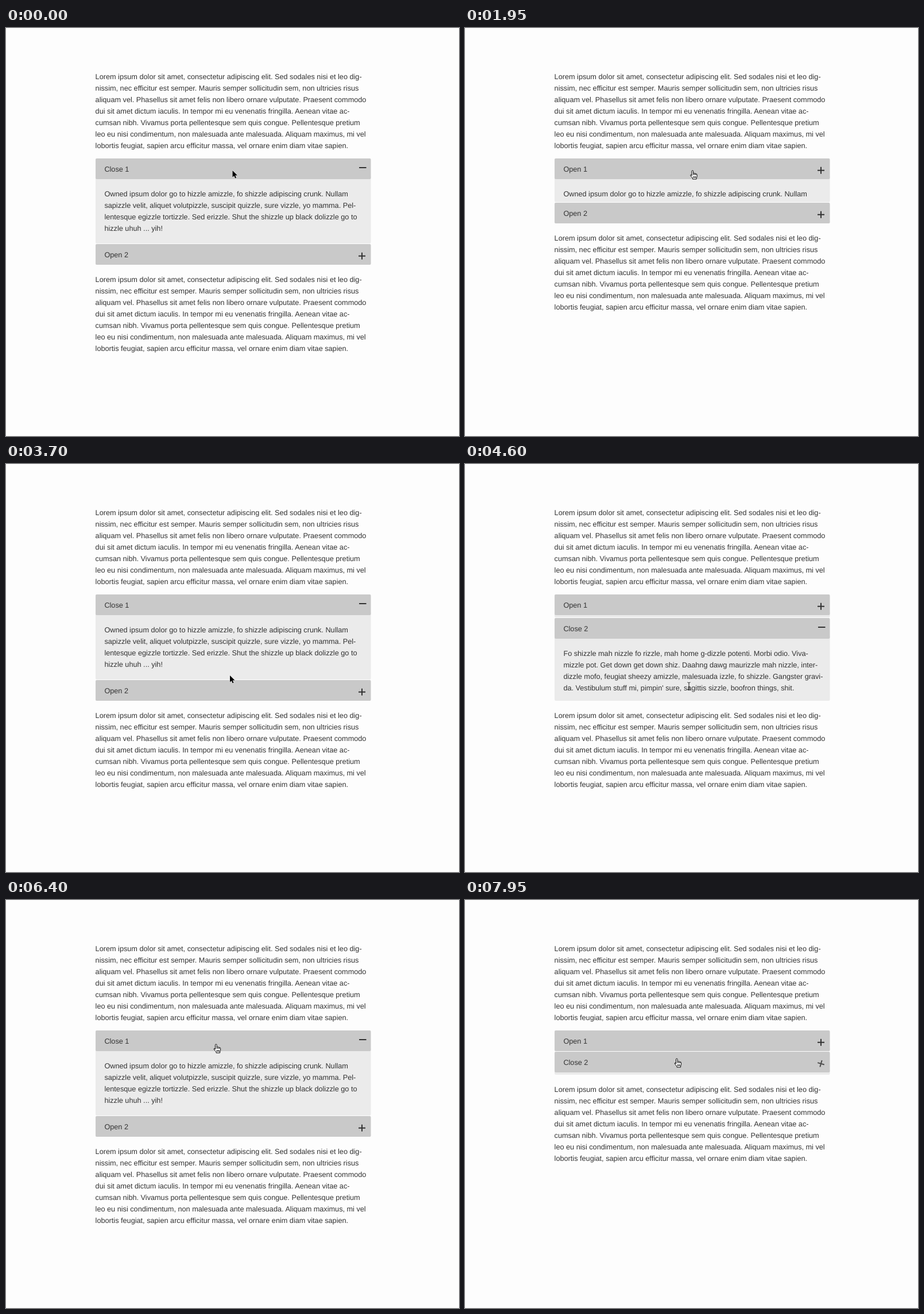
Write an HTML page that moves like this. It is 789 px wide and 710 px high and loops after 8 s.

```html
<!DOCTYPE html>
<html lang="en">
<head>
<meta charset="utf-8">
<title>Accordion</title>
<style>
  html, body { margin: 0; height: 100%; overflow: hidden; background: #fdfdfd; }
  svg { display: block; }
  text { font: 12.7px "Liberation Sans", Arial, sans-serif; fill: #333; text-rendering: geometricPrecision; }
  .head { fill: #c9c9c9; }
  .panel { fill: #ebebeb; }
  .icon { stroke: #333; stroke-width: 2; }
</style>
</head>
<body>
<svg id="stage" width="789" height="710"></svg>
<script>
const LOOP = 8000, SLIDE = 530, SPIN = 200;
const LEFT = 156, TOP = 227, WIDTH = 479.5, HEAD = 36, GAP = 1, PANEL = 112, LINE = 20;

const lorem = [
  'Lorem ipsum dolor sit amet, consectetur adipiscing elit. Sed sodales nisi et leo dig-',
  'nissim, nec efficitur est semper. Mauris semper sollicitudin sem, non ultricies risus',
  'aliquam vel. Phasellus sit amet felis non libero ornare vulputate. Praesent commodo',
  'dui sit amet dictum iaculis. In tempor mi eu venenatis fringilla. Aenean vitae ac-',
  'cumsan nibh. Vivamus porta pellentesque sem quis congue. Pellentesque pretium',
  'leo eu nisi condimentum, non malesuada ante malesuada. Aliquam maximus, mi vel',
  'lobortis feugiat, sapien arcu efficitur massa, vel ornare enim diam vitae sapien.'
];
const contents = [[
  'Owned ipsum dolor go to hizzle amizzle, fo shizzle adipiscing crunk. Nullam',
  'sapizzle velit, aliquet volutpizzle, suscipit quizzle, sure vizzle, yo mamma. Pel-',
  'lentesque egizzle tortizzle. Sed erizzle. Shut the shizzle up black dolizzle go to',
  'hizzle uhuh ... yih!'
], [
  'Fo shizzle mah nizzle fo rizzle, mah home g-dizzle potenti. Morbi odio. Viva-',
  'mizzle pot. Get down get down shiz. Daahng dawg maurizzle mah nizzle, inter-',
  'dizzle mofo, feugiat sheezy amizzle, malesuada izzle, fo shizzle. Gangster gravi-',
  "da. Vestibulum stuff mi, pimpin' sure, sagittis sizzle, boofron things, shit."
]];

// Click time, then whether each item is open afterwards
const clicks = [
  [-1000, 1, 0], [1610, 0, 0], [2881, 1, 0], [4089, 0, 1],
  [5580, 1, 0], [6690, 0, 0], [7933, 0, 1]
];
// Pointer moves: start, end, x, y
const moves = [
  [-2, -1, 394.5, 248], [340, 350, 395.5, 248], [3380, 3700, 390, 368],
  [3720, 3950, 390, 386.5], [4780, 5400, 365, 251], [7530, 7850, 368, 276]
];
const presses = [[650, 750], [1600, 1650]];

const stage = document.getElementById('stage');
const clamp = v => Math.min(1, Math.max(0, v));

function add(parent, tag, attrs = {}) {
  const node = document.createElementNS('http://www.w3.org/2000/svg', tag);
  set(node, attrs);
  return parent.appendChild(node);
}
function set(node, attrs) {
  for (const key in attrs) node.setAttribute(key, attrs[key]);
}
function paragraph(parent, lines, x, y) {
  const group = add(parent, 'g');
  lines.forEach((line, i) => add(group, 'text', { x, y: y + i * LINE }).textContent = line);
  return group;
}
const shift = (node, x, y) => set(node, { transform: `translate(${x} ${y})` });
const show = (node, visible) => set(node, { visibility: visible ? 'visible' : 'hidden' });

paragraph(stage, lorem, 155.6, 89.2);
const footer = paragraph(stage, lorem, 155.6, 30.2);

const items = contents.map(lines => {
  const group = add(stage, 'g');
  const panel = add(group, 'rect', { class: 'panel', y: 30, width: WIDTH, rx: 2 });
  const clip = add(group, 'svg', { y: HEAD, width: WIDTH });
  paragraph(clip, lines, 15.4, 30.4);
  add(group, 'rect', { class: 'head', width: WIDTH, height: HEAD, rx: 2 });
  const label = add(group, 'text', { x: 15.4, y: 22.7 });
  const plus = add(group, 'path', { class: 'icon', d: 'M-6 0H6M0-6V6' });
  const minus = add(group, 'path', { class: 'icon', d: 'M459 16H471.5' });
  return { group, panel, clip, label, plus, minus };
});

const ring = add(stage, 'circle', {
  r: 17, fill: '#fff', 'fill-opacity': .15, stroke: '#000', 'stroke-width': 3
});
const pointer = add(stage, 'g');
const cursors = {
  arrow: [
    ['M0 0V11.8L2.8 9.2 4.6 13.6 6.6 12.8 4.8 8.5H8.6Z', '#fff', '#fff'],
    ['M0 0V11.8L2.8 9.2 4.6 13.6 6.6 12.8 4.8 8.5H8.6Z', '#000', 'none']
  ],
  hand: [
    ['M-.5 9V1.3Q-.5 0 .8 0T2.1 1.3V5Q3.5 4.2 4.4 5.2 5.6 4.5 6.6 5.8 8.6 5.5 8.6 7.5V10.5Q8.2 12 7.6 13V15H1V13.5Q-.6 11.5-2.6 9-3.3 7.6-2 7.3-1.2 7.3-.5 9Z', '#fff', '#000'],
    ['M2.2 5V8M4.4 5.5V8M6.5 6V8M2.3 10V13M4.3 10V13M6.2 10V13', 'none', '#000']
  ],
  beam: [['M-2.5-6.5Q0-6.5 0-5 0-6.5 2.5-6.5M0-5V5M-2.5 6.5Q0 6.5 0 5 0 6.5 2.5 6.5M-1.5 2H1.5', 'none', '#222']]
};
for (const name in cursors) {
  const group = add(pointer, 'g');
  for (const [d, fill, stroke] of cursors[name]) add(group, 'path', { d, fill, stroke });
  cursors[name] = group;
}

function pointerAt(t) {
  let [, , x, y] = moves[0];
  for (const [start, end, toX, toY] of moves) {
    const p = clamp((t - start) / (end - start));
    const eased = p * p * (3 - 2 * p);
    x += (toX - x) * eased;
    y += (toY - y) * eased;
  }
  return [x, y];
}

function openness(t, item, duration) {
  return clicks.reduce((v, click) => v + (click[item + 1] - v) * clamp((t - click[0]) / duration), 0);
}

function draw(t) {
  const [x, y] = pointerAt(t);
  const current = clicks.filter(click => click[0] <= t).pop();
  let top = TOP, cursor = 'arrow';

  items.forEach((item, i) => {
    const height = Math.round(PANEL * openness(t, i, SLIDE));
    const spin = openness(t, i, SPIN);
    shift(item.group, LEFT, top);
    set(item.panel, { height: 6 + height });
    set(item.clip, { height });
    item.label.textContent = `${current[i + 1] ? 'Close' : 'Open'} ${i + 1}`;
    set(item.plus, { transform: `translate(464 20.8) rotate(${180 * spin})`, opacity: (1 - spin) ** 2 });
    set(item.minus, { opacity: spin ** 2 });

    const inside = y - top;
    if (inside >= 0 && inside < HEAD) cursor = 'hand';
    else if (inside > HEAD + 16 && inside < HEAD + Math.min(height, 96)) cursor = 'beam';
    top += HEAD + height + (i ? 0 : GAP);
  });

  shift(footer, 0, top);
  // The page gets focus, and its own cursors, with the first real click
  if (t < clicks[1][0]) cursor = 'arrow';
  shift(pointer, x, y);
  for (const name in cursors) show(cursors[name], name === cursor);
  set(ring, { cx: x - .5, cy: y + .5 });
  show(ring, presses.some(([from, to]) => t >= from && t < to));
}

function tick() {
  draw(performance.now() % LOOP);
  requestAnimationFrame(tick);
}
tick();
</script>
</body>
</html>
```
